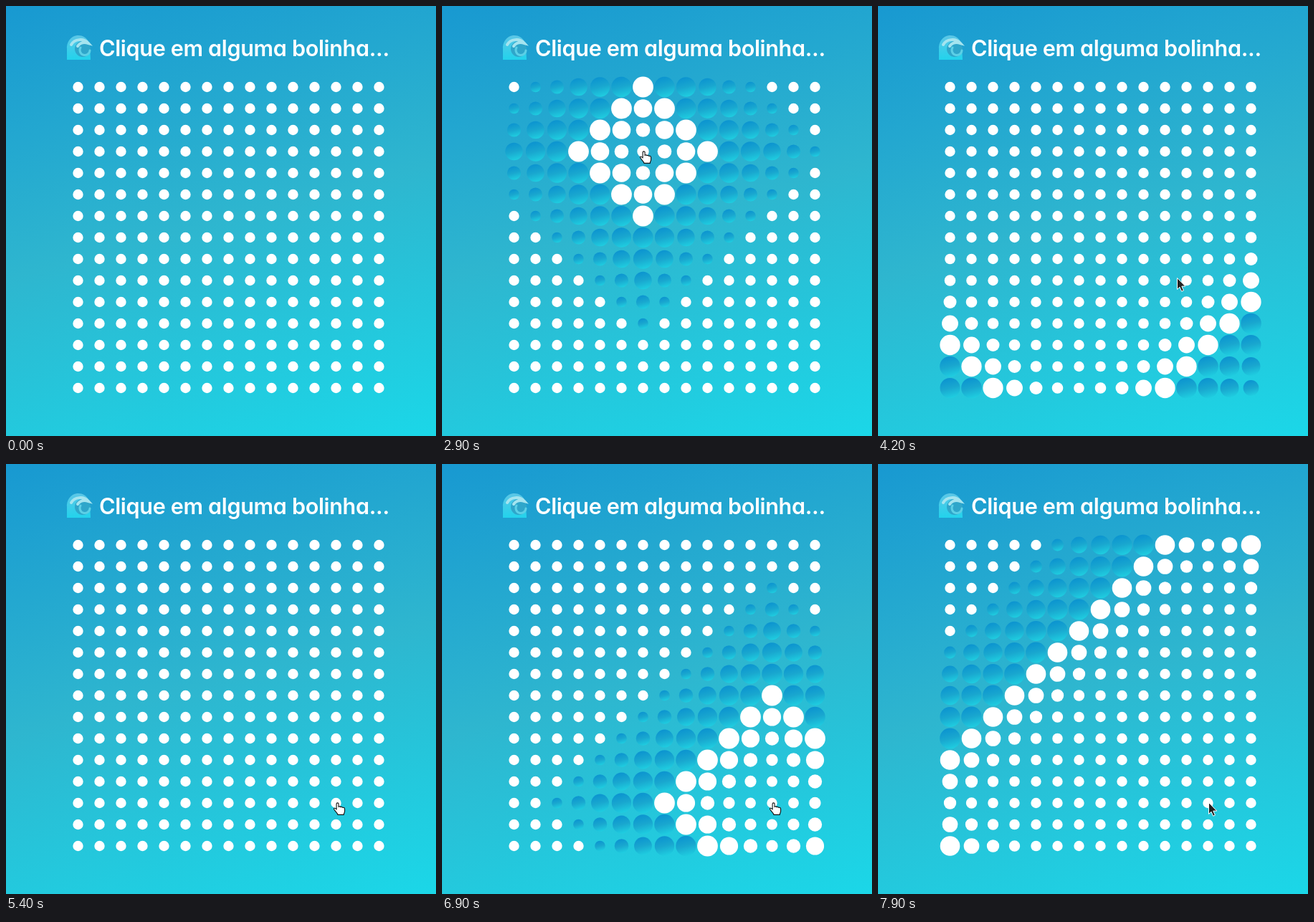
An HTML page for the animation above (8 s loop, 600 by 600 pixels).

```html
<!DOCTYPE html>
<html lang="pt">
<head>
<meta charset="utf-8">
<title>Bolinhas</title>
<style>
  html, body { margin: 0; width: 100%; height: 100%; overflow: hidden; }
  svg { display: block; width: 100vw; height: 100vh; background: linear-gradient(165deg, #1899d1, #2eb6cf 50%, #1bd7e8); }
  text { font: 600 30.6px Inter, "Open Sans", sans-serif; font-feature-settings: "cv11"; letter-spacing: -.35px; fill: #fff; }
</style>
</head>
<body>
<svg viewBox="0 0 600 600">
  <defs>
    <linearGradient id="sea" x1=".37" y1="0" x2=".63" y2="1">
      <stop offset="0" stop-color="#0b93d0"/>
      <stop offset=".5" stop-color="#19a7cf"/>
      <stop offset="1" stop-color="#1fcfe1"/>
    </linearGradient>
    <linearGradient id="water" x1="0" y1="0" x2="0" y2="1">
      <stop offset="0" stop-color="#5cc6e6"/>
      <stop offset="1" stop-color="#22d3ec"/>
    </linearGradient>
  </defs>
  <g fill="none" stroke-linecap="round">
    <path d="M85 75V60A16 17 0 0 1 117 56L118 75Z" fill="url(#water)"/>
    <circle cx="107" cy="60" r="11" fill="#2fa6ca"/>
    <path d="M91 54A14 12 0 0 1 115 52Q105 49 100 56" stroke="#a5e4ef" stroke-width="4"/>
    <path d="M104 58A7 7 0 1 0 117 62" stroke="#5ccfe6" stroke-width="3"/>
  </g>
  <text x="130" y="70">Clique em alguma bolinha...</text>
  <g id="dots"></g>
  <path id="arrow" d="M.5.5V16.5L4 13.2L6.6 19.2L9.4 18L6.8 12.1H11.8Z" fill="#222" stroke="#fff"/>
  <path id="hand" d="M.1 2.5C.1.3 3.1.3 3.1 2.5V6.4c.6-.9 2.4-.7 2.9.3c.8-.6 2.2-.3 2.6.7c1.6-.6 3 .2 3 2v3c0 2.2-1.3 2.6-1.3 5H2c0-1.8-2.6-3.6-5-7.2C-4.5 8-2 7.5.1 10Z" fill="#fff" stroke="#111" stroke-width="1.1" stroke-linejoin="round"/>
</svg>
<script>
const LOOP = 8000, TICK = 100;
const SIZE = 15, GAP = 30, LEFT = 100.5, TOP = 113, RADIUS = 7.2;
const STAGGER = 100, HOLD = 500, LAG = 25;

// clicked dot, first visible time, age of the ripple then
const ripples = [
  { col: 6, row: 3, at: 2200, age: 140 },
  { col: 12, row: 12, at: 5900, age: 60 }
];
const RATE = .955;

// the pointer appears at a point, then makes moves: from, to, x, y
const entry = { at: 600, x: 443, y: 308 };
const moves = [
  [600, 800, 345, 279], [900, 1100, 279, 217], [1200, 1500, 279, 210],
  [1800, 1900, 280, 202], [3800, 4200, 417, 379], [4200, 5000, 465, 461],
  [5100, 5200, 459, 467], [5300, 5400, 461, 472]
];

const byId = id => document.getElementById(id);
const arrow = byId("arrow"), hand = byId("hand");
const show = (el, on) => el.style.display = on ? "" : "none";
const clamp = x => Math.min(1, Math.max(0, x));
const easeOut = x => 1 - (1 - x) ** 2;

const dots = Array.from({ length: SIZE * SIZE }, (_, i) => {
  const col = i % SIZE, row = Math.floor(i / SIZE);
  const el = document.createElementNS("http://www.w3.org/2000/svg", "circle");
  el.setAttribute("cx", LEFT + col * GAP);
  el.setAttribute("cy", TOP + row * GAP);
  byId("dots").append(el);
  return { el, col, row };
});

const bezier = (a, b, s) => 3 * a * s * (1 - s) ** 2 + 3 * b * s * s * (1 - s) + s ** 3;

// the CSS "ease" curve
function ease(x) {
  if (x <= 0 || x >= 1) return clamp(x);
  let lo = 0, hi = 1;
  for (let i = 0; i < 20; i++) {
    const mid = (lo + hi) / 2;
    if (bezier(.25, .25, mid) < x) lo = mid; else hi = mid;
  }
  return bezier(.1, 1, lo);
}

function drawDots(t) {
  const ripple = ripples.findLast(r => t >= r.at);
  for (const { el, col, row } of dots) {
    let age = -1;
    if (ripple) {
      const steps = Math.abs(col - ripple.col) + Math.abs(row - ripple.row);
      age = ripple.age + (t - ripple.at) * RATE - steps * STAGGER;
    }
    const grow = ease(age / HOLD) - ease((age - HOLD - LAG) / HOLD);
    el.setAttribute("r", RADIUS * (1 + grow));
    el.setAttribute("fill", age >= 0 && age < HOLD ? "url(#sea)" : "#fff");
  }
}

function drawPointer(t) {
  let { x, y } = entry;
  for (const [from, to, nextX, nextY] of moves) {
    const k = easeOut(clamp((t - from) / (to - from)));
    x += (nextX - x) * k;
    y += (nextY - y) * k;
  }
  const pointing = ripples.some(r => t >= r.at - 500 && t < r.at + 1600);
  show(hand, pointing);
  show(arrow, t >= entry.at && !pointing);
  for (const el of [arrow, hand]) el.setAttribute("transform", `translate(${x} ${y})`);
}

function draw(now) {
  const t = Math.floor((now % LOOP) / TICK) * TICK;
  drawDots(t);
  drawPointer(t);
}

let start;
function frame(now) {
  start ??= now;
  draw(now - start);
  requestAnimationFrame(frame);
}
draw(0);
requestAnimationFrame(frame);
</script>
</body>
</html>
```
